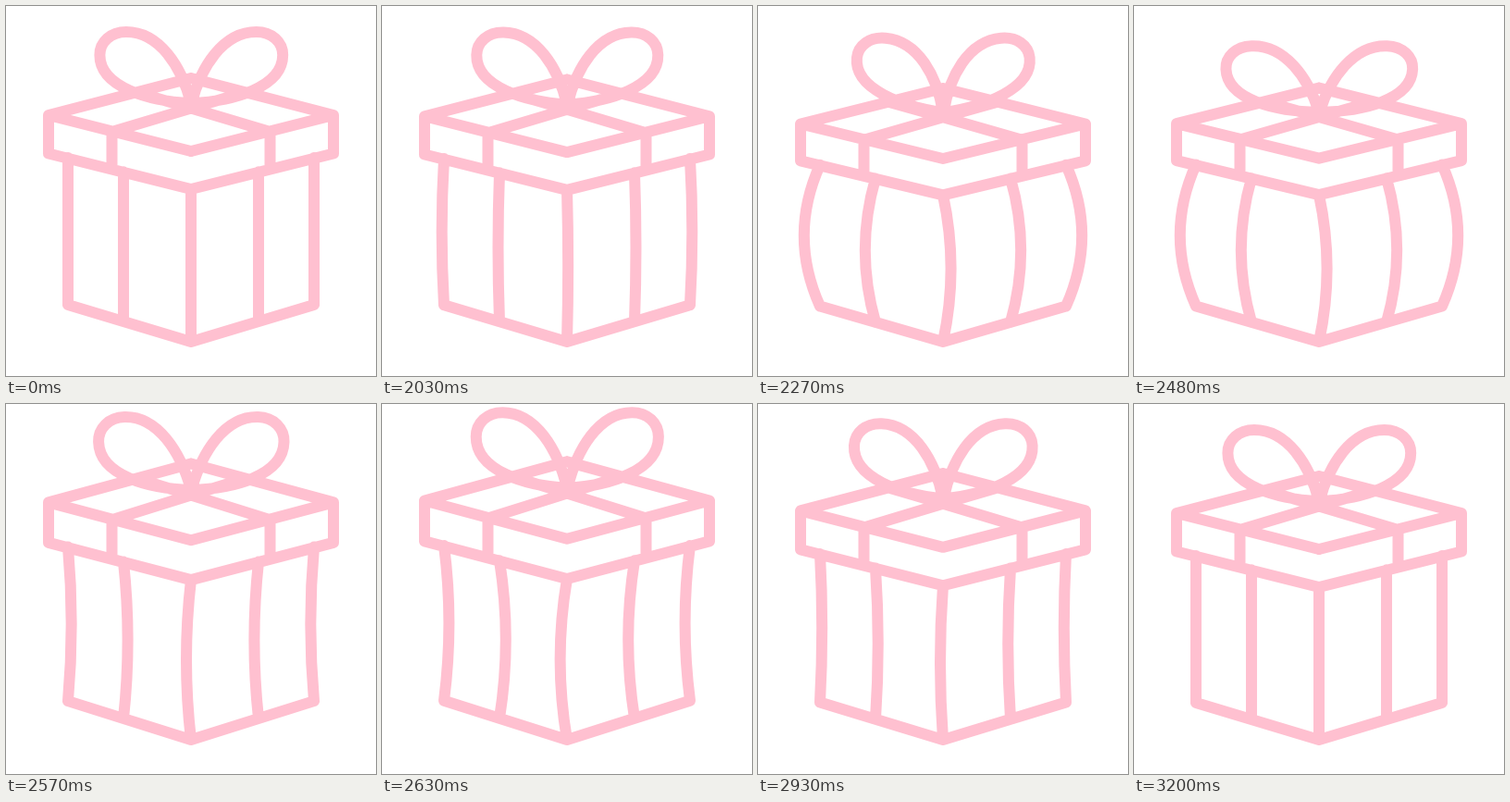
Animation, 400 px wide and 400 px high, one loop 3230 ms. Source, as an HTML page with a canvas:

```html
<!DOCTYPE html>
<html>
<head>
<meta charset="utf-8">
<style>
html, body { margin: 0; background: #fff; overflow: hidden; }
canvas { display: block; }
</style>
</head>
<body>
<canvas id="stage" width="400" height="400"></canvas>
<script>
const ctx = document.getElementById('stage').getContext('2d');
const LOOP = 3230, START = 2000, STEP = 30, FLOOR = 363;

const progress = (t, from, to) => Math.min(1, Math.max(0, (t - from) / (to - from)));
const sineOut = u => Math.sin(u * Math.PI / 2);
const sineInOut = u => (1 - Math.cos(u * Math.PI)) / 2;

// The box squashes, springs up and settles; the bow lags behind
function poseAt(t) {
  const squash = sineOut(progress(t, 2000, 2410));
  const spring = progress(t, 2410, 2580) ** 3;
  const settle = progress(t, 2580, 3200);
  const swing = (from, to) => sineInOut(progress(t, from, to));
  return {
    stretch: 0.111 * spring - 0.045 * squash - 0.066 * (1 - (1 - settle) ** 2.2),
    bend: 2 * spring - squash - sineInOut(settle),
    bow: 5.6 * sineOut(progress(t, 2000, 2270)) - 8 * swing(2270, 2500)
      + 6.2 * swing(2500, 2780) - 3.8 * swing(2780, 3200)
  };
}

function line(x, y, ...rest) {
  ctx.moveTo(x, y);
  for (let i = 0; i < rest.length; i += 2) ctx.lineTo(rest[i], rest[i + 1]);
}

// Body edge at x from the middle; wider bulge towards the sides
function bodyEdge(x, bend) {
  const d = Math.abs(x) / 133, drop = 40 * (1 - d);
  const side = x < 0 ? -1 : 1;
  const bulge = bend < 0 ? 10 + 10 * d * d : 7.5 - 2 * d * d;
  const top = 164 + 0.85 * drop, bottom = 323 + drop;
  ctx.moveTo(x, top);
  ctx.quadraticCurveTo(x - 2 * side * bulge * bend, (top + bottom) / 2, x, bottom);
}

function bowLoop(degrees) {
  ctx.translate(0, 105);
  ctx.rotate(degrees * Math.PI / 180);
  ctx.moveTo(0, 0);
  ctx.bezierCurveTo(-10, -39, -34, -77, -70, -77);
  ctx.bezierCurveTo(-87, -77, -98.6, -66, -98.6, -52);
  ctx.bezierCurveTo(-98.6, -17, -45, -2, 0, 0);
}

// Left half; the right one is its mirror image
function half(side, bow) {
  ctx.save();
  ctx.scale(side, 1);
  line(0, 78, -154, 118, 0, 157);
  line(-154, 118, -154, 159.5, 0, 198);
  line(-85.5, 175, -85.5, 136, 0, 110.5, 58, 93.5);
  line(-133, 323, 0, FLOOR);
  ctx.translate(-0.6 * side * side + 0.6 * (1 + side) / 2, 0);
  bowLoop(bow);
  ctx.restore();
}

function draw(t) {
  const { stretch, bend, bow } = poseAt(t);
  ctx.fillStyle = '#fff';
  ctx.fillRect(0, 0, 400, 400);
  ctx.beginPath();
  ctx.save();
  ctx.translate(200, FLOOR);
  ctx.scale(1, 1 + stretch);
  ctx.translate(0, -FLOOR);
  for (const x of [-133, -73, 0, 73, 133]) bodyEdge(x, bend);
  half(1, bow);
  half(-1, bow);
  ctx.restore();

  ctx.strokeStyle = '#ffc0d0';
  ctx.lineWidth = 12;
  ctx.lineCap = ctx.lineJoin = 'round';
  ctx.stroke();
}

const origin = performance.now();
function tick() {
  const t = (performance.now() - origin) % LOOP;
  draw(START + STEP * Math.max(0, Math.floor((t - START) / STEP)));
  requestAnimationFrame(tick);
}
tick();
</script>
</body>
</html>
```
